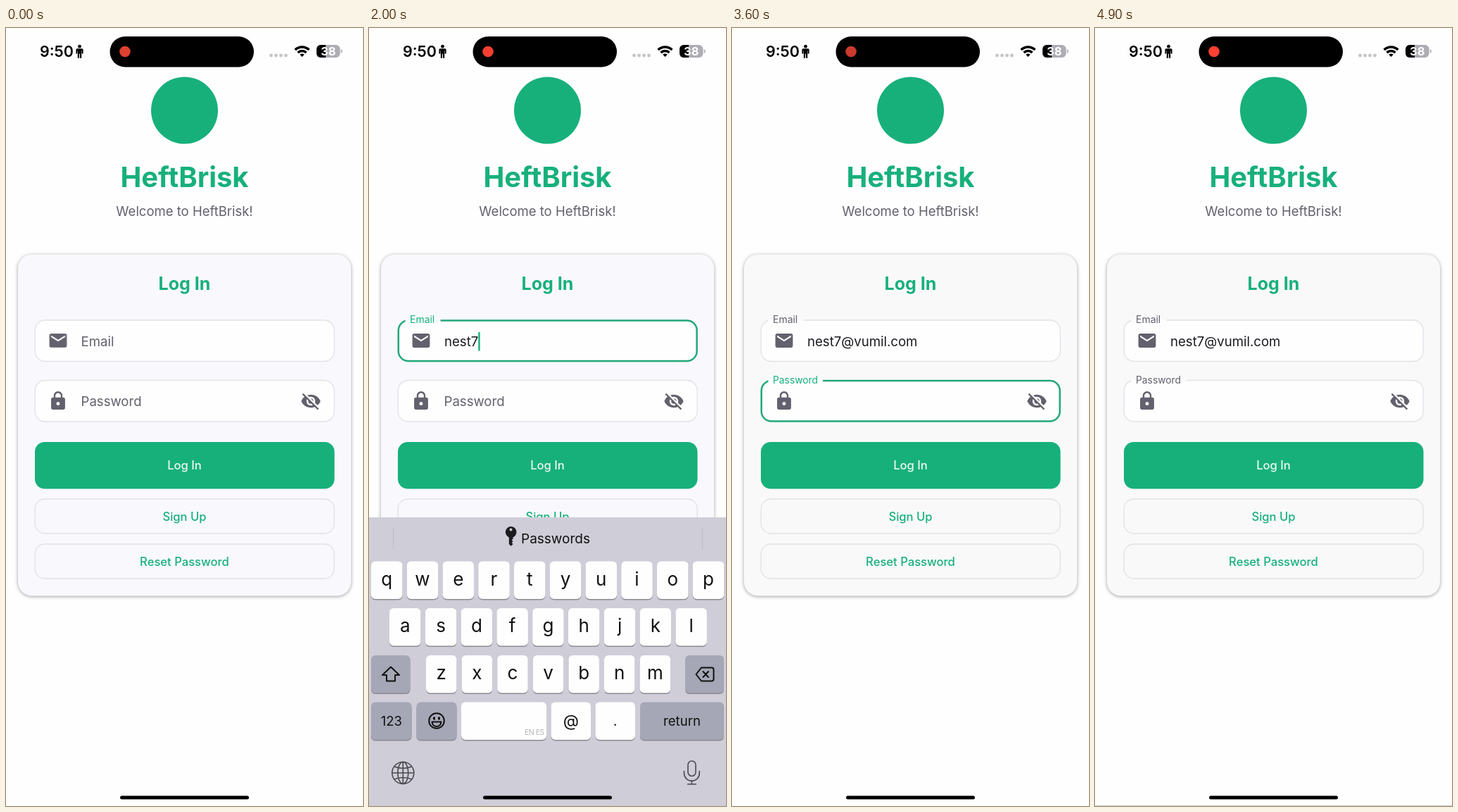
These frames come from a looping animation (507x1105 px, 5000 ms). An HTML page:

```html
<!DOCTYPE html>
<html lang="en">
<head>
<meta charset="utf-8">
<title>Log in</title>
<style>
  html, body { margin: 0; width: 100%; height: 100%; overflow: hidden; background: #fefefe; }
  svg { display: block; width: 100%; height: 100%; font-family: Inter, "Open Sans", sans-serif; }
  .mid { text-anchor: middle; }
  .green { fill: #17b07b; }
  .grey { fill: #62616d; }
  .line { fill: none; stroke: #e2e1e8; stroke-width: 1.3; }
  .field { fill: #fefefe; stroke: #e2e1e8; stroke-width: 1.3; }
  .ring { fill: none; stroke: #23a97b; stroke-width: 2.5; }
  .btn { font-size: 16.6px; font-weight: 500; }
  .entry { font-size: 18.6px; }
  .thin { fill: none; stroke: #4a4a50; stroke-width: 1.6; }
  .ink { fill: none; stroke: #111; stroke-width: 2; stroke-linejoin: round; stroke-linecap: round; }

  .card, .kbBack, .dark, .dot, .kb, .abc, .num, .mail, .mailTone, .mailLabel, .mailGap,
  .pass, .passTone, .passLabel, .passGap { animation: 5s step-end infinite; }

  .card { animation-name: card; filter: drop-shadow(0 1.5px 2.5px rgba(0,0,0,.38)); }
  .kbBack { animation-name: kbBack; }
  .dark { animation-name: dark; }
  @keyframes card { 0% { fill: #f9f8fc; } 66%, 100% { fill: #f9f9f9; } }
  @keyframes kbBack { 0% { fill: #cfcdd8; } 66%, 100% { fill: #cccdd2; } }
  @keyframes dark { 0% { fill: #a5a7b6; } 66%, 100% { fill: #a2a4b1; } }

  .dot { animation-name: dot; animation-timing-function: linear; }
  @keyframes dot {
    0%, 100% { fill: #e0402f; } 6%, 34% { fill: #ff4034; } 52% { fill: #e03a2c; }
    72% { fill: #cb3a2e; } 86% { fill: #ee4031; } 94%, 98% { fill: #ff4034; }
  }

  .kb { animation-name: slide; }
  @keyframes slide {
    0% { transform: translateY(410px); }
    5.2% { transform: translateY(410px); animation-timing-function: cubic-bezier(.11,.35,.23,1); }
    12% { transform: translateY(4px); animation-timing-function: linear; }
    13.6% { transform: translateY(0); }
    66% { transform: translateY(410px); }
    86% { transform: translateY(0); }
    89.6% { transform: translateY(0); animation-timing-function: cubic-bezier(.11,.35,.23,1); }
    98% { transform: translateY(409px); animation-timing-function: linear; }
    100% { transform: translateY(410px); }
  }

  .abc { animation-name: abc; }
  .num { animation-name: num; }
  @keyframes abc { 0% { visibility: visible; } 26% { visibility: hidden; } 38%, 100% { visibility: visible; } }
  @keyframes num { 0% { visibility: hidden; } 26% { visibility: visible; } 38%, 100% { visibility: hidden; } }

  .mail { animation-name: mail; }
  .mailTone { animation-name: mailTone; }
  .mailGap { animation-name: mailGap; }
  .mailLabel { animation-name: mailLabel; }
  @keyframes mail { 0% { opacity: 0; } 5.2% { opacity: 1; } 66% { opacity: 0; } 86% { opacity: 1; } 89.6%, 100% { opacity: 0; } }
  @keyframes mailTone { 0% { fill: #62616d; } 5.2% { fill: #17b07b; } 66% { fill: #62616d; } 86% { fill: #17b07b; } 89.6%, 100% { fill: #62616d; } }
  @keyframes mailGap { 0% { opacity: 0; } 6.5%, 100% { opacity: 1; } }
  @keyframes mailLabel {
    0% { transform: translate(106.5px, 451.5px); }
    5.2% { transform: translate(106.5px, 451.5px); animation-timing-function: ease; }
    8.2%, 100% { transform: translate(58px, 419.3px) scale(.752); }
  }

  .pass { animation-name: pass; }
  .passTone { animation-name: passTone; }
  .passGap { animation-name: passGap; }
  .passLabel { animation-name: passLabel; }
  @keyframes pass { 0% { opacity: 0; } 66% { opacity: 1; } 86%, 100% { opacity: 0; } }
  @keyframes passTone { 0% { fill: #62616d; } 66% { fill: #17b07b; } 86%, 100% { fill: #62616d; } }
  @keyframes passGap { 0% { opacity: 0; } 67.3%, 100% { opacity: 1; } }
  @keyframes passLabel {
    0% { transform: translate(106.5px, 537px); }
    66% { transform: translate(106.5px, 537px); animation-timing-function: ease; }
    69%, 100% { transform: translate(58px, 504.8px) scale(.745); }
  }
</style>
</head>
<body>
<svg viewBox="0 0 507 1105" preserveAspectRatio="none">
  <!-- status bar -->
  <text x="48" y="41.2" font-size="21.5" font-weight="600">9:50</text>
  <g>
    <circle cx="104.5" cy="26.2" r="2.4"/>
    <path d="M101 29.3h7q1.6 0 1.6 1.6v5.6h-1.9v-4h-.5v10.3h-2.2v-6h-1v6h-2.2V32.500h-.5v4h-1.900v-5.600q0-1.600 1.600-1.600z"/>
  </g>
  <rect x="147.500" y="12" width="204.500" height="43.500" rx="21.700"/>
  <circle class="dot" cx="169" cy="33.500" r="7.800"/>
  <g fill="#c5c4c8">
    <circle cx="376.500" cy="39" r="2.400"/><circle cx="383.500" cy="39" r="2.400"/>
    <circle cx="390.500" cy="39" r="2.400"/><circle cx="397.500" cy="39" r="2.400"/>
  </g>
  <g fill="none" stroke="#000" stroke-width="3.500">
    <path d="M410.600 31.100a14 14 0 0 1 19.800 0M414.500 35a8.500 8.500 0 0 1 12 0"/>
    <path d="M420.500 41l-3.200-3.200a4.500 4.500 0 0 1 6.400 0z" fill="#000" stroke="none"/>
  </g>
  <rect x="441" y="24" width="33.500" height="18" rx="6" fill="#aeadb3"/>
  <path d="M447 24h7v18h-7a6 6 0 0 1-6-6v-6a6 6 0 0 1 6-6z"/>
  <path d="M475.800 30q2 .6 2 3t-2 3z" fill="#aeadb3"/>
  <text class="mid" x="457.800" y="39" font-size="16.500" font-weight="700" fill="#fff">38</text>

  <!-- header -->
  <circle class="green" cx="253.500" cy="117" r="47.500"/>
  <text class="mid green" x="253.500" y="226" font-size="40" font-weight="700">HeftBrisk</text>
  <text class="mid grey" x="253.500" y="267" font-size="18.500">Welcome to HeftBrisk!</text>

  <!-- form -->
  <rect class="card" x="17" y="321.500" width="473" height="485" rx="20"/>
  <text class="mid green" x="253.500" y="371.500" font-size="25" font-weight="700">Log In</text>

  <rect class="field" x="41.200" y="415" width="425" height="58.500" rx="14.500"/>
  <rect class="ring mail" x="41.800" y="415.600" width="423.800" height="57.300" rx="14"/>
  <rect class="mailGap" x="51.500" y="413.500" width="50" height="4" fill="#fdfdfe"/>
  <g class="mailLabel"><text class="entry mailTone">Email</text></g>
  <path class="grey" transform="translate(59.100 429.100) scale(1.240)" d="M20 4H4c-1.100 0-1.990.9-1.990 2L2 18c0 1.100.9 2 2 2h16c1.100 0 2-.9 2-2V6c0-1.100-.9-2-2-2zm0 4l-8 5-8-5V6l8 5 8-5v2z"/>
  <text id="typed" class="entry" x="107" y="452" fill="#1b1a21"></text>
  <rect id="caret" class="green mail" x="107.500" y="432" width="2.400" height="26.500"/>

  <rect class="field" x="41.200" y="500.500" width="425" height="58.500" rx="14.500"/>
  <rect class="ring pass" x="41.800" y="501.100" width="423.800" height="57.300" rx="14"/>
  <rect class="passGap" x="51.500" y="499" width="77.500" height="4" fill="#fdfdfe"/>
  <g class="passLabel"><text class="entry passTone">Password</text></g>
  <path class="grey" transform="translate(59.100 514.800) scale(1.240)" d="M18 8h-1V6c0-2.760-2.240-5-5-5S7 3.240 7 6v2H6c-1.100 0-2 .9-2 2v10c0 1.100.9 2 2 2h12c1.100 0 2-.9 2-2V10c0-1.100-.9-2-2-2zm-6 9c-1.100 0-2-.9-2-2s.9-2 2-2 2 .9 2 2-.9 2-2 2zm3.100-9H8.900V6c0-1.710 1.390-3.100 3.100-3.100 1.710 0 3.100 1.390 3.100 3.100v2z"/>
  <path class="grey" transform="translate(418.100 515.100) scale(1.240)" d="M12 7c2.760 0 5 2.240 5 5 0 .65-.13 1.260-.36 1.830l2.920 2.920c1.510-1.260 2.700-2.890 3.430-4.750-1.730-4.390-6-7.500-11-7.500-1.400 0-2.740.25-3.980.7l2.160 2.160C10.740 7.130 11.350 7 12 7zM2 4.270l2.280 2.280.46.46C3.080 8.300 1.780 10.020 1 12c1.730 4.390 6 7.500 11 7.500 1.550 0 3.030-.3 4.380-.84l.42.42L19.730 22 21 20.730 3.270 3 2 4.270zM7.530 9.800l1.550 1.550c-.05.21-.08.43-.08.65 0 1.660 1.340 3 3 3 .22 0 .44-.03.65-.08l1.550 1.550c-.67.33-1.410.53-2.200.53-2.760 0-5-2.240-5-5 0-.79.2-1.530.53-2.200zm4.310-.78l3.150 3.150.02-.16c0-1.660-1.340-3-3-3l-.17.01z"/>

  <rect class="green" x="41" y="588" width="425.500" height="66.500" rx="14"/>
  <text class="mid btn" x="253.500" y="627.200" fill="#effaf5">Log In</text>
  <rect class="line" x="41.200" y="669" width="425" height="49" rx="14"/>
  <text class="mid btn green" x="253.500" y="699.500">Sign Up</text>
  <rect class="line" x="41.200" y="733" width="425" height="49" rx="14"/>
  <text class="mid btn green" x="253.500" y="763.500">Reset Password</text>

  <!-- keyboard -->
  <g class="kb">
    <rect class="kbBack" y="695" width="507" height="420"/>
    <path d="M34.500 709v31M473.500 709v31" stroke="#bfbec8" stroke-width="1.300"/>
    <path d="M201.500 708a8 8 0 0 1 3 15.400v2.100l-1.800 1.900 1.800 1.900-1.800 2 1.800 1.700-3 2.700-2.700-2.700v-9.600a8 8 0 0 1 2.700-15.400zm0 2.600a2 2 0 1 0 .01 0z" fill="#1c1b20"/>
    <text x="216" y="732" font-size="19" fill="#111">Passwords</text>
    <g id="shared"></g>
    <g id="abc" class="abc"></g>
    <g id="num" class="num"></g>
    <path class="ink" d="M472 908.500h14.500q3 0 3 3v13q0 3-3 3H472l-7.500-9.500zM474.500 914l7.500 8M482 914l-7.500 8"/>
    <path class="ink abc" d="M31 907.500l12 11.500h-6v8.500h-12V919h-6z"/>
    <g>
      <circle class="ink" cx="96" cy="984" r="10.800"/>
      <path d="M89.500 985.500h13q-.8 6.500-6.500 6.500t-6.500-6.500z" class="ink" stroke-width="1.600"/>
      <ellipse cx="92.500" cy="980.500" rx="1.500" ry="2.200"/><ellipse cx="99.500" cy="980.500" rx="1.500" ry="2.200"/>
    </g>
    <text x="221" y="1004" font-size="10.500" letter-spacing="-.5" fill="#b4b4b9">EN ES</text>
    <g class="thin">
      <circle cx="48.300" cy="1058" r="15.500"/><ellipse cx="48.300" cy="1058" rx="7.500" ry="15.500"/>
      <path d="M32.800 1058h31M48.300 1042.500v31M36 1049q12.300 5 24.600 0M36 1067q12.300-5 24.600 0"/>
    </g>
    <g class="thin">
      <rect x="453" y="1041" width="11" height="21.500" rx="5.500"/>
      <path d="M447.500 1055v3.500a10.900 10.900 0 0 0 21.800 0V1055M458.400 1069.500v4.500M452 1074h13"/>
    </g>
  </g>
  <rect x="162" y="1090.500" width="183" height="5" rx="2.500"/>
</svg>
<script>
const $ = id => document.getElementById(id);
const rowY = [757.5, 824, 891, 957.5], keyH = 53.500;

function add(parent, tag, attrs, text) {
  const el = document.createElementNS('http://www.w3.org/2000/svg', tag);
  for (const k in attrs) el.setAttribute(k, attrs[k]);
  if (text) el.textContent = text;
  parent.append(el);
}

function key(parent, row, x, w, label, size = 26, base = 34, dark = false) {
  const y = rowY[row], box = { x, width: w, height: keyH, rx: 6 };
  add(parent, 'rect', { ...box, y: y + 1.400, fill: '#8a8a92' });
  add(parent, 'rect', { ...box, y, fill: '#fefefe', class: dark ? 'dark' : '' });
  add(parent, 'text', { x: x + w / 2, y: y + base, 'font-size': size, class: 'mid', fill: '#111' }, label);
}

function keys(parent, row, x, pitch, w, labels, size, base) {
  [...labels].forEach((c, i) => key(parent, row, x + i * pitch, w, c, size, base));
}

const shared = $('shared'), abc = $('abc'), num = $('num');
key(shared, 2, 449, 55, '', 0, 0, true);
key(shared, 3, 67.500, 57, '', 0, 0, true);
key(shared, 3, 131, 121, '');
key(shared, 3, 258.500, 56.500, '@', 23, 34);
key(shared, 3, 321.500, 56.500, '.', 20, 33);
key(shared, 3, 385, 119, 'return', 18.600, 33, true);

keys(abc, 0, 3, 50.750, 44.500, 'qwertyuiop');
keys(abc, 1, 29, 50.800, 44.500, 'asdfghjkl');
keys(abc, 2, 81, 50.600, 43.500, 'zxcvbnm');
key(abc, 2, 3, 55.500, '', 0, 0, true);
key(abc, 3, 3, 57.500, '123', 18.500, 33.500, true);

keys(num, 0, 3, 50.750, 44.500, '1234567890', 25, 36.500);
keys(num, 1, 30, 56.800, 49.500, '$!~&=#[]', 25, 36);
keys(num, 2, 83, 87.200, 79.500, '._-+', 25, 36);
key(num, 2, 3, 55.500, '#+=', 14.500, 33, true);
key(num, 3, 3, 57.500, 'ABC', 16.400, 33, true);

const address = 'nest7@vumil.com';
const strokes = [720, 880, 1020, 1180, 1620, 2020, 2110, 2210, 2310, 2400, 2500, 2680, 2780, 2880, 2980];
const typed = $('typed'), caret = $('caret');
let shown = -1;

function draw() {
  const t = performance.now() % 5000;
  const n = strokes.filter(s => s <= t).length;
  if (n !== shown) {
    shown = n;
    typed.textContent = address.slice(0, n);
    caret.setAttribute('x', n ? 107 + typed.getComputedTextLength() : 107.500);
  }
  requestAnimationFrame(draw);
}
draw();
</script>
</body>
</html>
```
